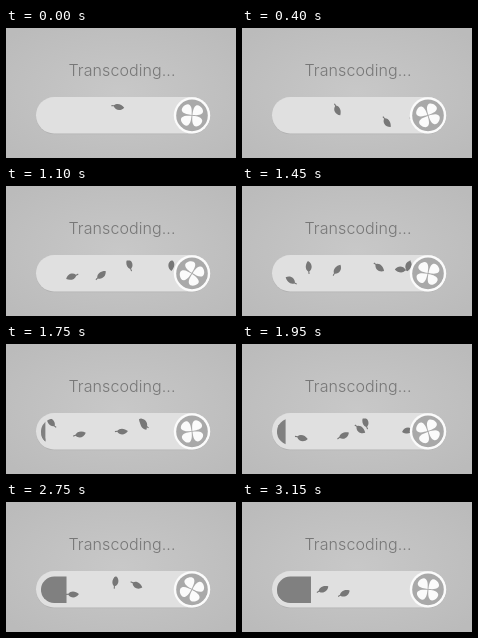
An HTML page that plays this animation: 230x130 px, repeating every 3.25 s.

```html
<!DOCTYPE html>
<html>
<head>
<meta charset="utf-8">
<style>
html, body { margin: 0; width: 100%; height: 100%; overflow: hidden; background: #c2c2c2; }
svg { display: block; width: 230px; height: 130px; }
text { font: 300 16px Inter, "Liberation Sans", sans-serif; letter-spacing: .08px; fill: #777; text-anchor: middle; }
</style>
</head>
<body>
<svg viewBox="0 0 230 130">
  <defs>
    <radialGradient id="bg" cx=".5" cy=".5" r=".65">
      <stop offset="0" stop-color="#c8c8c8"/>
      <stop offset="1" stop-color="#bbb"/>
    </radialGradient>
    <clipPath id="track"><path d="M186 74.5H48.2a13.2 13.2 0 0 0 0 26.5H186z"/></clipPath>
    <path id="leaf" d="M-6.2 .6C-3.5 -4 2 -4 4.4 -.4L6.8 -.8V.4L4.4 .6C2 4 -3 3.4 -6.2 .6z"/>
    <path id="petal" d="M0 -.6C-2.2 -3 -5.3 -6 -5 -9.2C-4.6 -13.4 4.6 -13.4 5 -9.2C5.3 -6 2.2 -3 0 -.6z"/>
  </defs>
  <rect width="230" height="130" fill="url(#bg)"/>
  <text x="116" y="48">Transcoding...</text>
  <rect x="30" y="69.8" width="174" height="36.5" rx="18.2" fill="#aaa" opacity=".6"/>
  <rect x="30" y="69" width="174" height="36.5" rx="18.2" fill="#e0e0e0"/>
  <g clip-path="url(#track)">
    <g id="leaves" fill="#777"></g>
    <rect id="fill" x="35" y="74" height="28" fill="#808080"/>
  </g>
  <circle cx="186" cy="87.4" r="18.2" fill="#fbfbfb"/>
  <circle cx="186" cy="87.4" r="15.8" fill="#a9a9a9"/>
  <g id="fan" fill="#fbfbfb">
    <use href="#petal"/>
    <use href="#petal" transform="rotate(90)"/>
    <use href="#petal" transform="rotate(180)"/>
    <use href="#petal" transform="rotate(270)"/>
  </g>
</svg>
<script>
// born: step at which the leaf leaves the fan; crest: x of its highest point.
const leafList = [
  { born: -17.6, crest: 120, spin: 1, speed: 4.2 },
  { born: -1.8, crest: 45, spin: -1 },
  { born: 2.2, crest: 128, spin: 1 },
  { born: 8.1, crest: 160, spin: -1 },
  { born: 11.2, crest: 128, spin: 1 },
  { born: 13, crest: 155, spin: -1, speed: 9.7 },
  { born: 17.2, crest: 125, spin: 1 },
  { born: 20.2, crest: 160, spin: -1 }
];
const FAN_X = 186, FAN_Y = 87.4, WAVE = 170;
const $ = id => document.getElementById(id);

for (const leaf of leafList) {
  leaf.node = document.createElementNS("http://www.w3.org/2000/svg", "use");
  leaf.node.setAttribute("href", "#leaf");
  $("leaves").append(leaf.node);
}

function place(node, x, y, angle) {
  node.setAttribute("transform", `translate(${x} ${y}) rotate(${angle})`);
}

function draw(now) {
  const t = now % 3250;
  // Steps last 100 ms, except the one before 1450 ms, which is cut short.
  const step = t < 1450 ? Math.floor(t / 100) : 15 + Math.floor((t - 1450) / 100);
  for (const { node, born, crest, spin, speed = 7.1 } of leafList) {
    const age = step - born;
    const x = FAN_X - speed * age;
    const y = 87 - 8.5 * Math.cos((x - crest) / WAVE * 2 * Math.PI);
    place(node, x, y, -45 + spin * 13.5 * age);
  }
  $("fill").setAttribute("width", Math.max(0, 2.115 * step - 33.7));
  place($("fan"), FAN_X, FAN_Y, 50 - 5.625 * step);
}

const start = performance.now();
function tick() {
  draw(performance.now() - start);
  requestAnimationFrame(tick);
}
tick();
</script>
</body>
</html>
```
